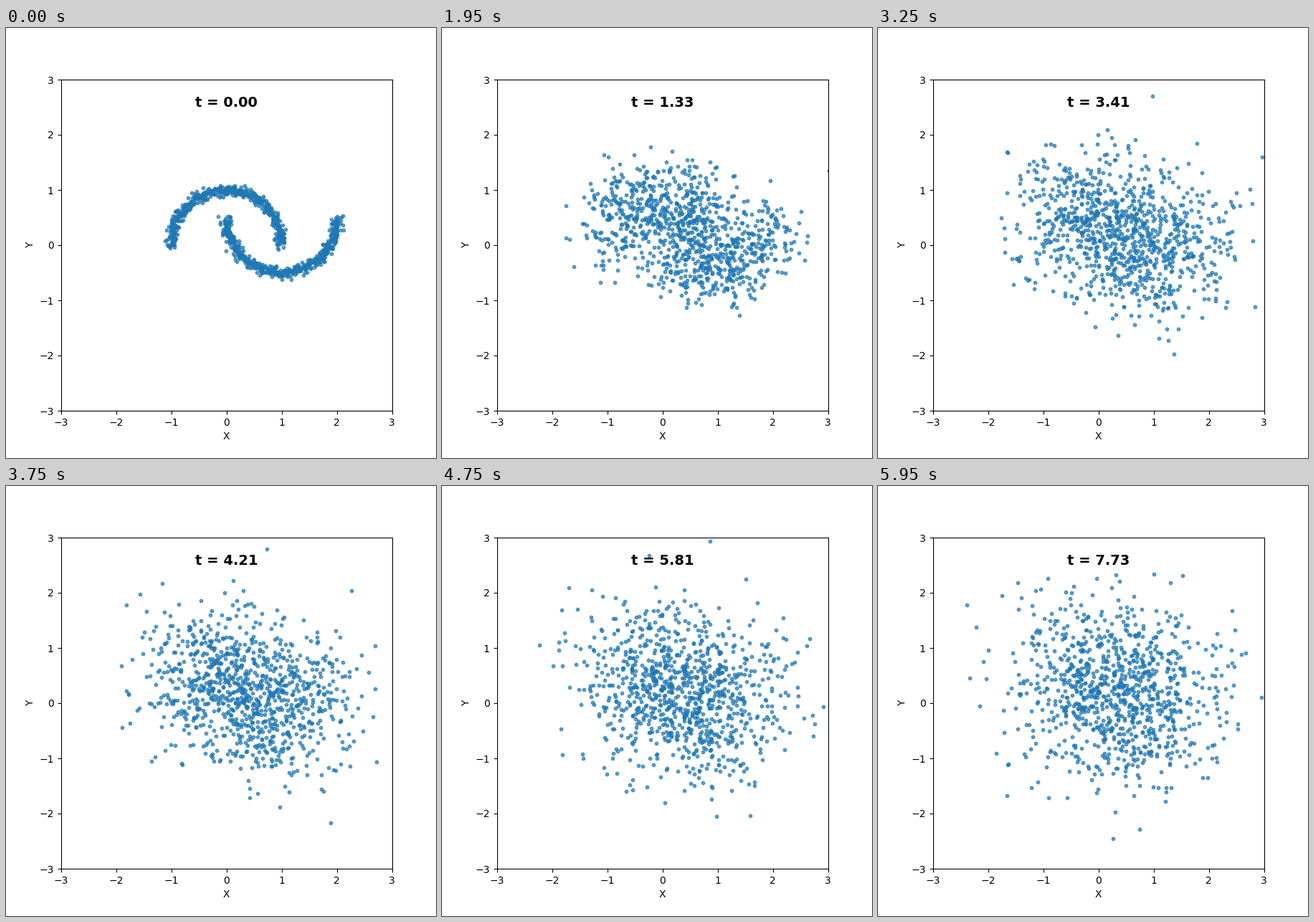
These frames come from a looping animation (600x600 px, 6000 ms). A matplotlib script:

```python
import numpy as np
import matplotlib.pyplot as plt
from matplotlib.animation import FuncAnimation

N_POINTS = 1000
FRAMES, INTERVAL = 120, 50
HOLD = 23                # frames spent on the undisturbed moons
T0, DT = 0.05, 0.08
BETA = 0.1               # strength of the variance-preserving diffusion

rng = np.random.RandomState(42)


def make_moons(n, noise):
    """Two interleaving half circles with Gaussian jitter."""
    a = np.linspace(0, np.pi, n // 2)
    upper = np.column_stack([np.cos(a), np.sin(a)])
    lower = np.column_stack([1 - np.cos(a), 0.5 - np.sin(a)])
    pts = np.vstack([upper, lower])
    order = np.arange(n)
    rng.shuffle(order)
    return pts[order] + rng.normal(scale=noise, size=pts.shape)


def diffuse(start, steps):
    """Euler-Maruyama path of dx = -beta/2 x dt + sqrt(beta) dW."""
    path = [start]
    for _ in range(steps):
        x = path[-1]
        drift = -0.5 * BETA * x * DT
        path.append(x + drift + np.sqrt(BETA * DT) * rng.normal(size=x.shape))
    return path


path = diffuse(make_moons(N_POINTS, 0.05), FRAMES - HOLD)

fig, ax = plt.subplots(figsize=(6, 6), dpi=100)
ax.set_xlim(-3, 3)
ax.set_ylim(-3, 3)
ax.set_aspect("equal")
ax.set_xlabel("X")
ax.set_ylabel("Y")
dots = ax.scatter(path[0][:, 0], path[0][:, 1], s=10, alpha=0.7)
label = ax.text(0.5, 0.95, "t = 0.00", transform=ax.transAxes, ha="center",
                va="top", fontsize=14, fontweight="bold")


def update(frame):
    step = max(0, frame - HOLD + 1)
    t = T0 + (step - 1) * DT if step else 0.0
    dots.set_offsets(path[step])
    label.set_text(f"t = {t:.2f}")
    return dots, label


anim = FuncAnimation(fig, update, frames=FRAMES, interval=INTERVAL,
                     repeat=True, repeat_delay=0, blit=False)
plt.show()
```
